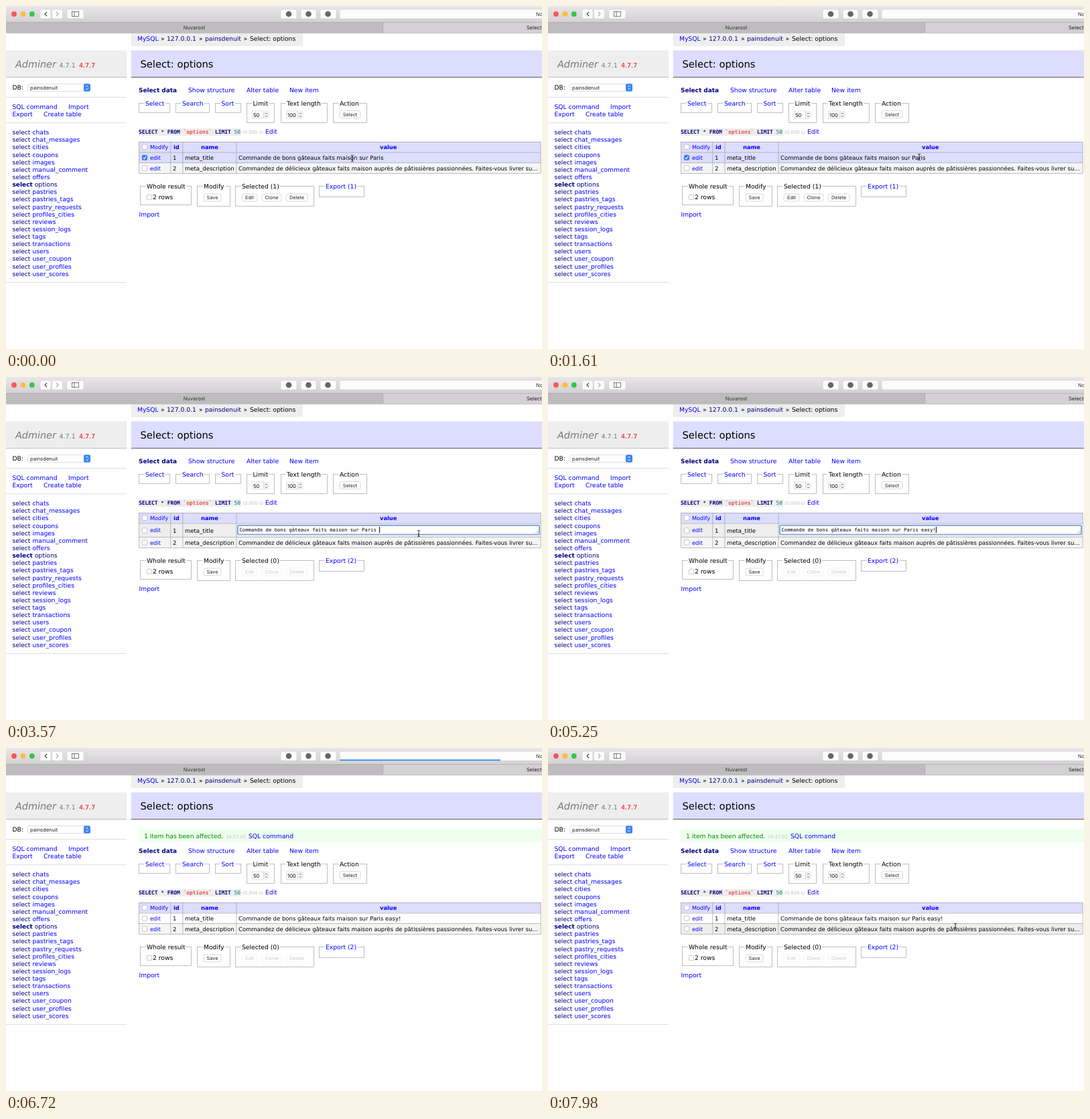
An HTML page with a canvas for the animation above (8000 ms loop, 800 by 513 pixels).

```html
<!DOCTYPE html>
<html lang="en">
<head>
<meta charset="utf-8">
<title>Select: options</title>
<style>
html, body { margin: 0; width: 100%; height: 100%; overflow: hidden; background: #fff; }
canvas { display: block; }
</style>
</head>
<body>
<canvas id="stage" width="800" height="513"></canvas>
<script>
const ctx = document.getElementById('stage').getContext('2d');
ctx.textRendering = 'geometricPrecision';

const LOOP = 8000, STEP = 70;
const HAIR = 0.64;
const SANS = '"DejaVu Sans", sans-serif';
const MONO = '"DejaVu Sans Mono", monospace';
const UI = 'Inter, sans-serif';
const BLUE = '#00f', NAVY = '#000080', GREY = '#999', PALE = '#c0c0c0';
const DATABASE = 'painsdenuit';
const TABLES = ('chats chat_messages cities coupons images manual_comment offers options pastries ' +
  'pastries_tags pastry_requests profiles_cities reviews session_logs tags transactions users ' +
  'user_coupon user_profiles user_scores').split(' ');
const TITLE = 'Commande de bons gâteaux faits maison sur Paris';
const DESCRIPTION = 'Commandez de délicieux gâteaux faits maison auprès de pâtissières passionnées. Faites-vous livrer su…';

const UNCHECK = 2170, EDIT = 2660, HIDE_POINTER = 4200, LOAD = 6300, RELOAD = 6720, SHOW_POINTER = 7000;
const KEYS = [[3570, ' '], [4200, 'e'], [4340, 'a'], [4480, 's'], [4620, 'y'], [4970, '!']];
const POINTER = [
  [0, 517, 228], [1610, 554, 226], [2450, 562, 228], [2800, 562, 228], [3500, 616, 234],
  [7000, 616, 234], [7490, 549, 230], [7980, 608, 267]
];

function text(str, x, y, color = '#000', size = 9.2, style = '', family = SANS) {
  ctx.font = `${style} ${size}px ${family}`;
  ctx.fillStyle = color;
  ctx.fillText(str, x, y);
}

function rect(x, y, w, h, color) {
  ctx.fillStyle = color;
  ctx.fillRect(x, y, w, h);
}

function rounded(x, y, w, h, r, fill, stroke) {
  ctx.beginPath();
  ctx.roundRect(x, y, w, h, r);
  ctx.fillStyle = fill;
  ctx.fill();
  if (stroke) {
    ctx.strokeStyle = stroke;
    ctx.lineWidth = HAIR;
    ctx.stroke();
  }
}

function line(points, color, width = 1) {
  ctx.beginPath();
  points.forEach(([x, y]) => ctx.lineTo(x, y));
  ctx.strokeStyle = color;
  ctx.lineWidth = width;
  ctx.stroke();
}

function outline(x, y, w, h, color) {
  ctx.strokeStyle = color;
  ctx.lineWidth = HAIR;
  ctx.strokeRect(x, y, w, h);
}

function circle(x, y, r, color) {
  ctx.beginPath();
  ctx.arc(x, y, r, 0, 7);
  ctx.fillStyle = color;
  ctx.fill();
}

function vertical(y0, y1, from, to) {
  const g = ctx.createLinearGradient(0, y0, 0, y1);
  g.addColorStop(0, from);
  g.addColorStop(1, to);
  return g;
}

function button(label, x, y, w, enabled = true) {
  rounded(x, y, w, 11, 2.5, '#fff', enabled ? '#c4c4c4' : '#eee');
  ctx.textAlign = 'center';
  text(label, x + w / 2, y + 8.1, enabled ? '#222' : '#c8c8c8', 7.3, '', UI);
  ctx.textAlign = 'left';
}

function checkbox(x, y, checked) {
  rounded(x - 3.7, y - 3.7, 7.4, 7.4, 1.7, checked ? '#2f7df6' : '#fff', checked ? '#2f7df6' : '#aaa');
  if (checked) line([[x - 2, y], [x - 0.5, y + 1.9], [x + 2.1, y - 2]], '#fff', 1.1);
}

function stepper(x, y, color) {
  line([[x - 1.6, y - 1.2], [x, y - 3], [x + 1.6, y - 1.2]], color, 0.9);
  line([[x - 1.6, y + 1.2], [x, y + 3], [x + 1.6, y + 1.2]], color, 0.9);
}

function fieldset(legend, x, y, w, h, legendX, color = '#000') {
  outline(x + 0.5, y + 0.5, w - 1, h, GREY);
  ctx.font = `9.2px ${SANS}`;
  rect(legendX - 1.5, y - 2, ctx.measureText(legend).width + 3, 5, '#fff');
  text(legend, legendX, y + 3.5, color);
}

function numberInput(value, x, y) {
  outline(x + 0.5, y + 0.5, 17, 11, '#ccc');
  text(value, x + 2, y + 9, '#000', 7.7, '', UI);
  rounded(x + 18, y + 1, 7, 10.5, 2.5, '#fff', '#ccc');
  stepper(x + 21.5, y + 6.3, '#444');
}

function drawBrowser(t) {
  rect(0, 0, 800, 24, vertical(0, 24, '#e8e6e8', '#d3d1d3'));
  ['#fc5753', '#fdbc40', '#33c748'].forEach((c, i) => circle(12 + i * 13.4, 12, 3.9, c));
  [[51, 16], [68.5, 16], [91, 25], [410, 24], [440, 23], [469, 24], [498, 310]].forEach(
    ([x, w]) => rounded(x, 5, w, 14, 2.5, '#fcfcfc', '#d0ced0'));
  line([[61, 9], [58, 12], [61, 15]], '#444', 1.1);
  line([[75, 9], [78, 12], [75, 15]], '#aaa', 1.1);
  outline(98.5, 8.5, 10, 7, '#333');
  line([[102, 8.5], [102, 15.5]], '#444', 0.8);
  [422, 451.5, 480.5].forEach(x => circle(x, 12, 4.3, '#666'));
  text('Not Secure', 791, 15, '#333', 7.6, '', UI);

  if (t >= LOAD && t < 6860) {
    const slow = 39 * Math.min(t - LOAD, 350) / 210;
    const fast = 250 * Math.max(0, Math.min(1, (t - 6650) / 100));
    rect(498, 17.2, slow + fast, 1.8, '#3b8ff7');
  }

  rect(0, 24, 563, 16, '#bebcbe');
  rect(563, 24, 237, 16, '#d3d1d3');
  rect(0, 24, 800, HAIR, '#aaa8aa');
  rect(562.5, 24, HAIR, 16, '#aaa8aa');
  rect(0, 40, 800, HAIR, '#a5a3a5');
  ctx.textAlign = 'center';
  text('Nuvarost', 281, 35, '#333', 7.6, '', UI);
  ctx.textAlign = 'left';
  text('Select: options - Adminer', 777, 35, '#222', 7.6, '', UI);
}

function drawSidebar() {
  rect(0, 66.4, 180, 39.8, '#eee');
  rect(0, 106.2, 180, HAIR, GREY);
  text('Adminer', 14, 92, '#777', 14.4, 'italic');
  text('4.7.1', 79.5, 92, '#777', 9.5);
  text('4.7.7', 109, 92, '#f00', 9.5);

  text('DB:', 9.5, 125);
  rounded(32.5, 116.5, 93, 11, 2.5, '#fff', '#ccc');
  text(DATABASE, 36, 124.7, '#222', 7.5, '', UI);
  rounded(116, 116.3, 10, 11.4, 2.5, '#3d86f0');
  stepper(121, 122, '#fff');

  [136.3, 174.5, 413].forEach(y => rect(0, y, 180, HAIR, '#ccc'));
  text('SQL command', 9.5, 154, BLUE);
  text('Import', 93, 154, BLUE);
  text('Export', 9.5, 165.3, BLUE);
  text('Create table', 56, 165.3, BLUE);

  TABLES.forEach((name, i) => {
    const y = 192.2 + i * 11.13, active = name === 'options';
    text('select', 9.5, y, NAVY, 9, active ? 'bold' : '');
    text(name, active ? 42.7 : 39.4, y, active ? NAVY : BLUE);
  });
}

function drawHeading() {
  rect(186.7, 41, 256.3, 19, '#eee');
  text('MySQL', 196, 52.4, BLUE);
  text('127.0.0.1', 240, 52.4, NAVY);
  text(DATABASE, 297, 52.4, NAVY);
  text('Select: options', 364, 52.4);
  [231, 288, 354.5].forEach(x => text('»', x, 52.4));
  rect(186.7, 66.4, 613.3, 39.8, '#ddf');
  rect(186.7, 106.2, 613.3, HAIR, '#000');
  text('Select: options', 200.5, 92, '#000', 14.7);
}

function drawMessage() {
  rect(198.3, 120.7, 601.7, 19.8, '#efe');
  text('1 item has been affected.', 206, 134.5, '#080');
  text('16:27:02', 328, 134.5, PALE, 6.7);
  text('SQL command', 362, 134.5, BLUE);
}

function drawQuery(seconds) {
  text('Select data', 198, 129.3, NAVY, 8.95, 'bold');
  text('Show structure', 272, 129.3, BLUE);
  text('Alter table', 359, 129.3, BLUE);
  text('New item', 423, 129.3, BLUE);

  fieldset('Select', 198, 145, 47, 14, 208, BLUE);
  fieldset('Search', 253, 145, 51, 14, 263, BLUE);
  fieldset('Sort', 312, 145, 39, 14, 321.5, BLUE);
  fieldset('Limit', 359, 145, 42, 29, 368.5);
  fieldset('Text length', 410, 145, 70, 29, 419);
  fieldset('Action', 488, 145, 51, 29, 498);
  numberInput('50', 367, 156.5);
  numberInput('100', 418, 156.5);
  button('Select', 498, 156.5, 31);

  rect(198, 183, 153, 11, '#eee');
  [['SELECT', 0, NAVY], ['*', 7, '#000'], ['FROM', 9, NAVY], ['`options`', 14, '#e00'],
   ['LIMIT', 24, NAVY], ['50', 30, '#077']].forEach(([word, column, color]) =>
    text(word, 198 + column * 4.75, 191.2, color, 7.9, color === NAVY ? 'bold' : '', MONO));
  text(`(${seconds} s)`, 353, 191.2, PALE, 6.9);
  text('Edit', 387, 191.2, BLUE);
}

function drawTextarea(value, caretOn) {
  rounded(346, 222, 450, 13.5, 1.5, '#fff', '#5b8fd8');
  ctx.strokeStyle = '#6f9fe0';
  ctx.lineWidth = 1.6;
  ctx.stroke();
  text(value, 348.5, 231, '#000', 7.23, '', MONO);
  if (caretOn) rect(348.5 + ctx.measureText(value).width, 224, 1, 9, '#000');
  line([[790, 234], [794.5, 229.5]], GREY, 0.7);
  line([[792.5, 234], [794.5, 232]], GREY, 0.7);
}

function drawTable(s) {
  const top = 203, row = 15.7, grow = s.editing ? 5 : 0;
  const first = top + row, second = first + row + grow, bottom = second + row;
  const inRow1 = s.hoverY >= first && s.hoverY < second;
  const inRow2 = s.hoverY >= second && s.hoverY < bottom;
  rect(198.3, top, 600, row, '#ddf');
  rect(198.3, first, 600, row + grow, s.checked ? '#ddf' : inRow1 ? '#eee' : '#fff');
  rect(198.3, second, 600, row, inRow2 ? '#eee' : '#f5f5f5');
  [top, first, second, bottom].forEach(y => rect(198.3, y, 600, HAIR, GREY));
  [198.3, 245.5, 263.6, 343.6, 797.8].forEach(x => rect(x, top, HAIR, bottom - top, GREY));

  checkbox(207, 210.7);
  text('Modify', 215, 213.5, BLUE, 8.2);
  text('id', 250, 214.3, BLUE, 8.3, 'bold');
  text('name', 291, 214.3, BLUE, 8.3, 'bold');
  text('value', 558, 214.3, BLUE, 8.3, 'bold');

  const y1 = s.editing ? 232.7 : 230, y2 = 246 + grow;
  checkbox(207, y1 - 3.2, s.checked);
  checkbox(207, y2 - 3.5);
  [[y1, '1', 'meta_title'], [y2, '2', 'meta_description']].forEach(([y, id, name]) => {
    text('edit', 215, y - 0.5, BLUE, 8.3);
    text(id, 249, y, '#000', 8.5);
    text(name, 267, y, '#000', 8.5);
  });
  if (s.editing) drawTextarea(s.value, s.caretOn);
  else text(s.value, 347, y1, '#000', 8.5);
  text(DESCRIPTION, 347, y2, '#000', 8.5);
}

function drawFooter(checked) {
  fieldset('Whole result', 200, 269, 77, 28, 210);
  checkbox(214, 286);
  text('2 rows', 219, 289);
  fieldset('Modify', 285, 269, 50, 30, 295);
  button('Save', 295, 281, 26);
  fieldset(`Selected (${checked ? 1 : 0})`, 342, 269, 118, 30, 352);
  button('Edit', 352, 281, 23, checked);
  button('Clone', 382, 281, 29, checked);
  button('Delete', 418, 281, 32, checked);
  fieldset(`Export (${checked ? 1 : 2})`, 467, 269, 68, 16, 477, BLUE);
  text('Import', 198.5, 314.7, BLUE);
}

function pointerAt(t) {
  const i = Math.max(1, POINTER.findIndex(p => p[0] >= t));
  const [t0, x0, y0] = POINTER[i - 1], [t1, x1, y1] = POINTER[i];
  const k = (t - t0) / (t1 - t0);
  return [x0 + (x1 - x0) * k, y0 + (y1 - y0) * k];
}

function drawPointer(x, y, isArrow) {
  ctx.save();
  ctx.translate(x, y);
  if (isArrow) {
    ctx.beginPath();
    [[0, 0], [0, 9.3], [2.2, 7.4], [3.7, 10.7], [5.2, 10], [3.8, 6.9], [6.6, 6.7]]
      .forEach(p => ctx.lineTo(...p));
    ctx.closePath();
    ctx.strokeStyle = '#fff';
    ctx.lineWidth = 1.4;
    ctx.stroke();
    ctx.fillStyle = '#000';
    ctx.fill();
  } else {
    line([[-2, -4.8], [0, -4], [2, -4.8]], '#222', 0.9);
    line([[0, -4], [0, 4]], '#222');
    line([[-2, 4.8], [0, 4], [2, 4.8]], '#222', 0.9);
    line([[-1.3, 1.8], [1.3, 1.8]], '#222', 0.8);
  }
  ctx.restore();
}

function draw(t) {
  const reloaded = t >= RELOAD, editing = t >= EDIT && !reloaded, checked = t < UNCHECK;
  const shift = reloaded ? 28 : 0;
  const [x, y] = pointerAt(t);
  const typed = KEYS.filter(([time]) => t >= time);
  const lastKey = typed.length ? typed.at(-1)[0] : EDIT;
  const blink = t < HIDE_POINTER ? 490 : 560;

  rect(0, 0, 800, 513, '#fff');
  drawBrowser(t);
  drawSidebar();
  drawHeading();
  if (reloaded) drawMessage();

  ctx.save();
  ctx.translate(0, shift);
  drawQuery(reloaded ? '0.004' : '0.000');
  drawTable({
    editing, checked,
    hoverY: y - shift,
    value: TITLE + typed.map(([, key]) => key).join(''),
    caretOn: Math.floor((t - lastKey) / blink) % 2 === 0
  });
  ctx.translate(0, editing ? 5 : 0);
  drawFooter(checked);
  ctx.restore();

  if (t < HIDE_POINTER || t >= SHOW_POINTER) drawPointer(x, y, reloaded && y < 247);
}

function frame() {
  const t = performance.now() % LOOP;
  draw(Math.floor(t / STEP) * STEP);
  requestAnimationFrame(frame);
}
frame();
</script>
</body>
</html>
```
